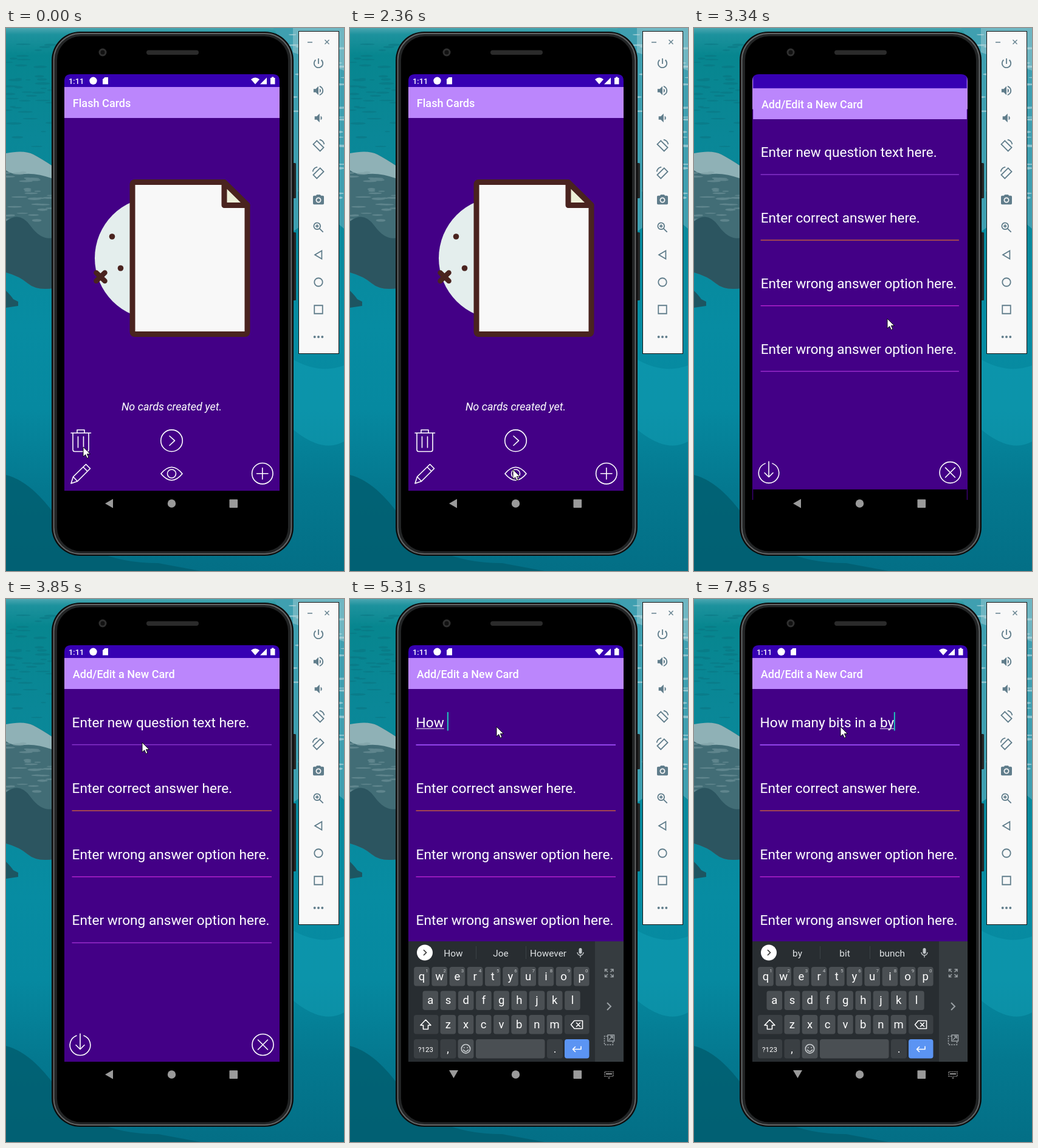
An HTML page that plays this animation: 556x893 px, repeating every 8000 ms.

```html
<!DOCTYPE html>
<html lang="en">
<head>
<meta charset="utf-8">
<title>Flash cards</title>
<style>
  html, body { margin: 0; width: 100%; height: 100%; overflow: hidden; background: #067d92; }
  svg { display: block; width: 556px; height: 893px; }
  text { font-family: Roboto, sans-serif; fill: #fff; white-space: pre; }
  .line { fill: none; stroke: #fff; stroke-width: 1.6; stroke-linecap: round; stroke-linejoin: round; }
  .title { font-size: 18.1px; font-weight: 500; }
  .field { font-size: 22.67px; }
  .mid { text-anchor: middle; }
  .tool { fill: #607d8b; }
  .tool .s { fill: none; stroke: #607d8b; stroke-width: 2; }
  .side { fill: none; stroke: #9aa0a4; stroke-width: 1.5; }
</style>
</head>
<body>
<svg id="stage" viewBox="0 0 556 893" xmlns="http://www.w3.org/2000/svg"></svg>
<script>
const LOOP = 8000;
const FIELD_X = 108.6;
const FIELD_GAP = 108.6;
const PIVOT = [273, 446];
const stage = document.getElementById('stage');

const rect = (x, y, w, h, fill, extra = '') =>
  `<rect x="${x}" y="${y}" width="${w}" height="${h}" fill="${fill}" ${extra}/>`;
const circle = (x, y, r, extra = '') => `<circle cx="${x}" cy="${y}" r="${r}" ${extra}/>`;
const path = (d, extra = '') => `<path d="${d}" ${extra}/>`;
const line = d => path(d, 'class="line"');
const label = (x, y, s, extra = '') => `<text x="${x}" y="${y}" ${extra}>${s}</text>`;

function gradient(id, stops) {
  const parts = stops.map(([o, c]) => `<stop offset="${o}" stop-color="${c}"/>`).join('');
  return `<linearGradient id="${id}" x2="0" y2="1">${parts}</linearGradient>`;
}

function seeded(seed) {
  return () => (seed = (seed * 16807) % 2147483647) / 2147483647;
}

// Scatters thin flat streaks over a box of the sea.
function streaks(seed, count, [x, y, w, h], color, opacity) {
  const rnd = seeded(seed);
  const one = () => `<ellipse cx="${(x + rnd() * w).toFixed(1)}" cy="${(y + rnd() * h).toFixed(1)}" ` +
    `rx="${(4 + rnd() * 9).toFixed(1)}" ry="${(.8 + rnd() * 1.4).toFixed(1)}"/>`;
  return `<g fill="${color}" opacity="${opacity}">${Array.from({ length: count }, one).join('')}</g>`;
}

function wallpaper() {
  return rect(0, 0, 556, 893, 'url(#sea)') +
    path('M440 0H556V330L520 300 472 335V60Z', 'fill="#3f9fb0"') +
    path('M472 0H556V70L472 40Z', 'fill="#6fb6c2"') +
    streaks(5, 40, [0, 20, 80, 175], '#0a707d', .45) +
    path('M0 208Q30 200 45 208T78 228V428Q50 432 36 420T0 402Z', 'fill="#426d76"') +
    path('M0 206Q30 200 45 208T78 228V248Q50 238 30 240T0 234Z', 'fill="#8fb1b6"') +
    streaks(23, 30, [0, 236, 75, 90], '#7c9ea4', .5) +
    path('M0 318Q22 300 40 325T78 345V428Q50 432 36 420T0 402Z', 'fill="#2c5560"') +
    path('M0 432Q8 440 12 446L20 450V457L0 460Z', 'fill="#1d5561"') +
    path('M472 545Q515 570 556 555V680Q520 700 472 660Z', 'fill="#12a0b5" opacity=".5"') +
    path('M0 735Q40 745 80 800 130 880 250 880L320 893H0Z', 'fill="#005b6d" opacity=".75"') +
    streaks(71, 60, [470, 5, 86, 320], '#c3dde2', .6);
}

function phone() {
  return rect(471, 222, 6, 58, '#242424', 'rx="1.5"') + rect(471, 336, 6, 112, '#242424', 'rx="1.5"') +
    rect(75, 6, 398, 862, '#0b0b0b', 'rx="47"') +
    rect(78.5, 9, 391, 856, '#222425', 'rx="44" stroke="#626566" stroke-width="2"') +
    rect(84, 13.5, 380, 847, '#000', 'rx="39"') +
    circle(159, 40, 6.5, 'fill="#303030"') + circle(159, 40, 3.5, 'fill="#111"') +
    rect(231, 36.5, 86, 7.5, '#2b2b2b', 'rx="3.7"');
}

function statusBar() {
  return rect(96, 76, 354, 22, '#3700b3') +
    label(103, 91.5, '1:11', 'font-size="12.8" font-weight="500"') +
    `<g fill="#fff">${circle(143.5, 86.8, 6.2)}` +
    path('M162.5 81H168V92.5H159V84.5Z') +
    path('M403 84.5Q410 78.5 417 84.5L410 92.5Z') + path('M429 81.5V92.5H418Z') +
    path('M437 80.5H440.5V82H442.5V92.5H435V82H437Z') + '</g>';
}

function page(title) {
  return rect(96, 97, 354, 51, '#bb86fc') + rect(96, 148, 354, 613, '#430086') +
    label(109.8, 130, title, 'class="title"');
}

function homePage() {
  const brown = '#4a231f';
  return page('Flash Cards') +
    circle(246.4, 378.5, 100.4, 'fill="#e4eeed" clip-path="url(#leftHalf)"') +
    `<g fill="${brown}">${circle(174.5, 343, 4.8)}${circle(188.5, 395, 4.8)}</g>` +
    path('M148.5 402.5 162.5 416M162.5 402.5 148.5 416', `stroke="${brown}" stroke-width="8.5" stroke-linecap="round"`) +
    `<g stroke="${brown}" stroke-width="9" stroke-linejoin="round">` +
    path('M212 253.500H359L397 291V499.500Q397 503.500 393 503.500H212Q208 503.500 208 499.500V257.500Q208 253.500 212 253.500Z', 'fill="#f8f8f8"') +
    path('M359 254V291.5H397Z', 'fill="#edefd8"') + '</g>' +
    label(272.5, 629, 'No cards created yet.', 'class="mid" font-size="18.03" font-style="italic"') +
    line('M107 666H139.500M117 666V661H129V666M110 666V693Q110 696.500 113 696.500H133Q136 696.500 136 693V666M118.500 672V690M127.500 672V690') +
    circle(272.5, 678.7, 17.8, 'class="line"') + line('M269 671 277.500 678.700 269 686.500') +
    line('M107 749 110.500 738 131.500 717.500 138.500 724.500 117.500 745.500ZM110.500 738 117.500 745.500M127 722 134 729') +
    line('M255 733Q272.500 711.500 290 733 272.500 754.500 255 733Z') + circle(272.5, 733, 7, 'class="line"') +
    circle(421.8, 732.7, 17.2, 'class="line"') + line('M412.500 732.700H431M421.800 723.500V742');
}

function editPage() {
  const hints = ['new question text', 'correct answer', 'wrong answer option', 'wrong answer option'];
  const colors = ['#8a35cf', '#c9603c', '#b924d2', '#9f2ed0'];
  const fields = hints.map((hint, i) => {
    const y = i * FIELD_GAP;
    return label(FIELD_X, 210.6 + y, `Enter ${hint} here.`, `class="field" id="hint${i}"`) +
      rect(108.5, 238.9 + y, 328.5, 1.4, colors[i], `id="rule${i}"`);
  }).join('');
  return rect(96, 76, 354, 21, '#3700b3', 'id="newStatus"') + rect(96, 760, 354, 60, '#000') +
    page('Add/Edit a New Card') + fields +
    line('M116 718A16.800 16.800 0 1 0 128 718M122 715V740.500M115 733.500 122 740.500 129 733.500') +
    circle(422.5, 733, 17.5, 'class="line"') + line('M414.500 725 430.500 741M430.500 725 414.500 741');
}

function keyboard() {
  const key = (x, y, w, fill = '#4a4f53') => rect(x, y, w, 31.5, fill, 'rx="4"');
  const rows = [['qwertyuiop', 118, 605], ['asdfghjkl', 132.3, 644.5], ['zxcvbnm', 161.3, 684]];
  let letters = '', digits = '';
  rows.forEach(([chars, x0, y], r) => [...chars].forEach((c, i) => {
    const x = x0 + i * 29.2;
    letters += key(x - 12.8, y, 25.6) + label(x, y + 21.7, c, 'class="mid" font-size="18.5"');
    if (!r) digits += label(x + 8.5, y + 8.8, (i + 1) % 10, 'class="mid" font-size="8" style="fill:#c4c8ca"');
  }));
  const words = [170, 248, 326].map((x, i) =>
    label(x, 588, '', `class="mid" id="word${i}" font-size="15.4" style="fill:#dfe3e5"`)).join('');
  return rect(96, 563, 307, 198, '#282d31') + rect(403, 563, 47, 198, '#363c40') +
    circle(123, 581.5, 13, 'fill="#fff"') +
    path('M121 577 125.500 581.500 121 586', 'fill="none" stroke="#333" stroke-width="1.6"') +
    rect(207, 571, 1, 21, '#3b4145') + rect(289, 571, 1, 21, '#3b4145') + words +
    rect(376.5, 574, 5, 9.5, '#c0c5c8', 'rx="2.5"') +
    path('M374 581A5 5 0 0 0 384 581M379 586V589.500', 'fill="none" stroke="#c0c5c8" stroke-width="1.4"') +
    `<g id="letters">${letters}</g>${digits}` +
    key(105, 684, 40.5, '#3a3f43') + path('M124.500 692 116 701H120.500V707.500H128.500V701H133Z', 'class="line"') +
    key(353, 684, 40.5, '#3a3f43') +
    path('M363.500 700 369 693.500H382.500V706.500H369ZM372.500 697 378.500 703M378.500 697 372.500 703', 'class="line"') +
    key(105, 724, 40, '#3a3f43') + label(124.5, 744.5, '?123', 'class="mid" font-size="11.5"') +
    key(148.5, 724, 26, '#3a3f43') + label(161, 746, ',', 'class="mid" font-size="18"') +
    key(177.5, 724, 26) + circle(190.5, 739.7, 7.2, 'class="line" style="stroke:#c9cdd0"') +
    path('M186.500 741.500Q190.500 747 194.500 741.500M187.800 737.500V738M193.200 737.500V738', 'class="line" style="stroke:#c9cdd0"') +
    key(207, 724, 113.5) + key(324, 724, 26, '#3a3f43') + label(337, 746, '.', 'class="mid" font-size="18"') +
    key(353, 724, 40.5, '#5b94f3') + line('M380 736V740.500H367M370.500 736.500 366.500 740.500 370.500 744.500') +
    '<g class="side">' +
    path('M419.500 613V609H423.500M428.500 609H433V613M433 617.500V621.500H428.500M423.500 621.500H419.500V617.500M419.500 609 424 613.500M433 609 428.500 613.500M433 621.500 428.500 617M419.500 621.500 424 617') +
    path('M423 664 429 670 423 676', 'stroke-width="2"') +
    path('M424 719H418.500V733H432.500V728', 'stroke-dasharray="2.500 1.500"') + path('M424 717H434.500V727H424ZM426 725 432 719M428 719H432V723') + '</g>';
}

function toolbar() {
  const icon = (y, body) => `<g transform="translate(503.200 ${y - 10.8}) scale(.9)">${body}</g>`;
  const s = d => path(d, 'class="s"');
  const turn = s('M9 3.500 21.500 16 15 22.500 2.500 10ZM14 1.500Q21 3 22.500 10');
  const icons = [
    path('M13 3h-2v10h2zM17.830 5.170l-1.420 1.420A6.920 6.920 0 0 1 19 12a7 7 0 1 1-11.420-5.420L6.170 5.170A9 9 0 1 0 21 12c0-2.740-1.230-5.180-3.170-6.830z'),
    path('M3 9v6h4l5 5V4L7 9zM16.500 12A4.500 4.500 0 0 0 14 8v8a4.500 4.500 0 0 0 2.500-4zM14 3.200v2.100a7 7 0 0 1 0 13.400v2.100a9 9 0 0 0 0-17.600z'),
    path('M5 9v6h4l5 5V4L9 9zM18.500 12A4.500 4.500 0 0 0 16 8v8a4.500 4.500 0 0 0 2.500-4z'),
    turn,
    `<g transform="matrix(-1 0 0 1 24 0)">${turn}</g>`,
    path('M9 2 7.200 4H4a2 2 0 0 0-2 2v12a2 2 0 0 0 2 2h16a2 2 0 0 0 2-2V6a2 2 0 0 0-2-2h-3.200L15 2z') +
      circle(12, 12, 4, 'stroke="#f8f8f8" stroke-width="2"'),
    circle(9.5, 9.5, 6, 'class="s"') + s('M14 14 20.500 20.500M6.500 9.500H12.500M9.500 6.500V12.500'),
    s('M18 4.500V19.500L5.500 12Z'),
    circle(12, 12, 7.5, 'class="s"'),
    s('M4.500 4.500H19.500V19.500H4.500Z'),
    circle(5, 12, 2.2) + circle(12, 12, 2.2) + circle(19, 12, 2.2)
  ];
  return rect(481.5, 5.5, 66, 530, '#f8f8f8', 'stroke="#111"') +
    path('M496 23.500H504M524.500 19.500 531.500 26.500M531.500 19.500 524.500 26.500', 'stroke="#607d8b" stroke-width="1.4"') +
    `<g class="tool">${icons.map((body, i) => icon(58 + i * 45, body)).join('')}</g>`;
}

stage.innerHTML = `<defs>
  ${gradient('sea', [[0, '#4aa6b1'], [.012, '#1d929d'], [.05, '#07868f'], [.2, '#0a8797'], [.55, '#078ca2'], [.7, '#0689a0'], [.85, '#04788f'], [1, '#036f86']])}
  <clipPath id="screen"><path d="M96 818V87Q96 76 107 76H439Q450 76 450 87V818Z"/></clipPath>
  <clipPath id="leftHalf"><rect x="140" y="270" width="68" height="220"/></clipPath>
  </defs>` + wallpaper() + phone() +
  `<g clip-path="url(#screen)">${statusBar()}<g id="home">${homePage()}</g><g id="edit">${editPage()}</g>` +
  label(FIELD_X, 210.6, '', 'class="field" id="typed"') + rect(0, 212.6, 0, 1.2, '#d8cbe6', 'id="underline"') +
  rect(0, 186, 2, 30.5, '#20c5bd', 'id="caret"') +
  `<g id="keys">${keyboard()}</g>${rect(96, 761, 354, 60, '#000', 'id="navBack"')}</g>
  <g fill="#9a9a9a"><path id="back"/>${circle(272.5, 782, 6.7)}${rect(367.5, 775.3, 13.6, 13.6, '#9a9a9a', 'rx="1"')}
  <g id="navKeys">${rect(419, 777.5, 14, 7.5, 'none', 'stroke="#9a9a9a" stroke-width="1.500" stroke-dasharray="1.500 1.200"')}
  ${rect(421, 780, 10, 2, '#9a9a9a')}${path('M424 787H428L426 789Z')}</g></g>` + toolbar() +
  `<path id="arrow" d="M0 0V16L3.800 12.600 6.300 18.400 8.900 17.300 6.400 11.600H11.500Z" fill="#fff" stroke="#000" stroke-width=".9"/>`;

const $ = Object.fromEntries([...stage.querySelectorAll('[id]')].map(el => [el.id, el]));
const show = (el, on) => el.setAttribute('visibility', on ? 'visible' : 'hidden');

// Pointer positions: time, x, y.
const POINTER = [
  [0, 127, 689], [150, 126, 685], [300, 125, 682], [1260, 127, 694], [1410, 133, 720], [1560, 137, 735],
  [1840, 155, 727], [1970, 210, 696], [2100, 256, 678], [2230, 267, 690], [2360, 268, 726],
  [2510, 300, 737], [2640, 370, 742], [2770, 415, 738], [2900, 413, 730], [3050, 400, 685],
  [3200, 368, 591], [3340, 318, 478], [3470, 272, 360], [3600, 240, 275], [3720, 227, 242], [3850, 224, 236],
  [4000, 233, 222], [4150, 241, 210]
];

const TYPING = [
  [4300, '', 'I The You'], [4740, 'H', 'How Hi Hey'], [4890, 'Ho', 'How Ho Home'], [5190, 'How', 'How Joe However'],
  [5310, 'How ', 'How Joe However'], [5460, 'How m', 'my me more'], [5600, 'How ma', 'may make man'],
  [5740, 'How man', 'man many mean'], [5870, 'How many', 'many man money'], [6150, 'How many ', 'people times minutes'],
  [6270, 'How many b', 'be but by'], [6420, 'How many bit', 'bit but bits'], [6730, 'How many bits', 'bit bits but'],
  [6900, 'How many bits ', 'of are and'], [7050, 'How many bits i', 'I in is'], [7330, 'How many bits in', 'in on into'],
  [7500, 'How many bits in a', 'a an and'], [7680, 'How many bits in a b', 'be bit but'],
  [7850, 'How many bits in a by', 'by bit bunch']
];

const latest = (list, t) => list.filter(([at]) => at <= t).pop();
const clamp = v => Math.max(0, Math.min(1, v));

const ruler = document.createElement('canvas').getContext('2d');
function textWidth(s) {
  ruler.font = '22.67px Roboto, sans-serif';
  return ruler.measureText(s).width;
}

function bezier(x, xs, ys) {
  const at = (p, u) => (1 - u) ** 3 * p[0] + 3 * (1 - u) ** 2 * u * p[1] + 3 * (1 - u) * u * u * p[2] + u ** 3 * p[3];
  let lo = 0, hi = 1;
  for (let i = 0; i < 24; i++) {
    const u = (lo + hi) / 2;
    if (at(xs, u) < x) lo = u; else hi = u;
  }
  return at(ys, lo);
}

// Fast start, very slow landing.
const windowEase = p => p < 1 / 6
  ? bezier(p, [0, .05, .1333, .1667], [0, 0, .06, .4])
  : bezier(p, [.1667, .2083, .25, 1], [.4, .82, 1, 1]);

function scaleFromPivot(el, s) {
  const [x, y] = PIVOT;
  el.setAttribute('transform', `translate(${x} ${y}) scale(${s}) translate(${-x} ${-y})`);
}

function drawWindows(t) {
  const since = t - 3135;
  const p = clamp(since / 400);
  const e = p < 1 ? windowEase(p) : 1;
  const opening = p > 0 && p < 1;
  scaleFromPivot($.home, 1 + .05 * e);
  scaleFromPivot($.edit, .85 + .15 * e);
  $.edit.setAttribute('opacity', clamp((since - 50) / 50));
  show($.home, p < 1);
  show($.edit, p > 0);
  show($.newStatus, opening);
  show($.navBack, !opening);
}

function drawTyping(t) {
  const entry = latest(TYPING, t);
  const focused = !!entry;
  const [, text, words] = entry || [0, '', 'I The You'];
  const trimmed = text.trimEnd();
  const start = textWidth(trimmed.slice(0, trimmed.lastIndexOf(' ') + 1));
  show($.hint0, t >= 3135 && !text);
  $.typed.textContent = text;
  $.underline.setAttribute('x', FIELD_X + start);
  $.underline.setAttribute('width', Math.max(0, textWidth(trimmed) - start));
  $.caret.setAttribute('x', FIELD_X + textWidth(text) - .4);
  show($.caret, focused);
  $.rule0.setAttribute('fill', focused ? '#9545ee' : '#8a35cf');
  $.rule0.setAttribute('height', focused ? 2 : 1.4);
  words.split(' ').forEach((word, i) => { $['word' + i].textContent = word; });
  $.letters.style.textTransform = text ? 'none' : 'uppercase';
}

function drawKeyboard(t) {
  const up = 1 - (1 - clamp((t - 4340) / 200)) ** 2;
  $.keys.setAttribute('transform', `translate(0 ${198 * (1 - up)})`);
  show($.keys, up > 0);
  show($.navKeys, up > 0);
  $.back.setAttribute('d', up > 0 ? 'M163 775H178L170.500 788Z' : 'M163 782 176 774.500V789.500Z');
}

function render(now) {
  const time = now % LOOP;
  const [heldPointer, x, y] = latest(POINTER, time);
  const heldKeys = latest([[4300], [4440], [4590]], time);
  const t = heldKeys ? heldKeys[0] : heldPointer;
  $.arrow.setAttribute('transform', `translate(${x} ${y})`);
  drawWindows(t);
  drawTyping(time);
  drawKeyboard(t);
}

const began = performance.now();
function tick() {
  render(performance.now() - began);
  requestAnimationFrame(tick);
}
tick();
</script>
</body>
</html>
```
